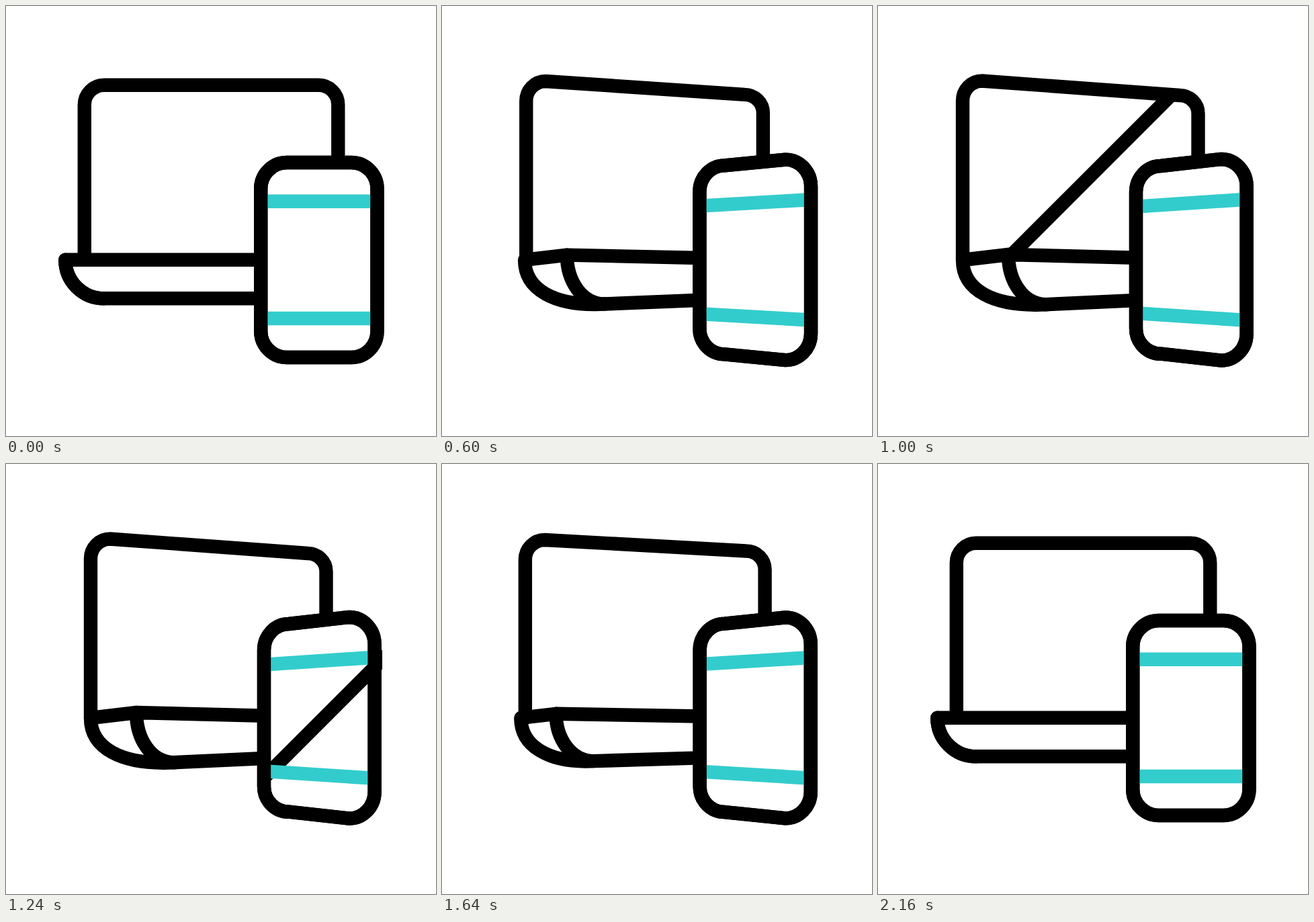
An HTML page for the animation above (2560 ms loop, 640 px wide and 640 px high).

```html
<!DOCTYPE html>
<html lang="en">
<head>
<meta charset="utf-8">
<title>Laptop and phone</title>
<style>
  html, body { margin: 0; width: 100%; height: 100%; overflow: hidden; background: #fff; }
  svg { display: block; width: 100vw; height: 100vh; }
  path { fill: none; stroke: #000; stroke-width: 20.4; stroke-linejoin: round; }
  .teal { stroke: #3cc; }
</style>
</head>
<body>
<svg viewBox="0 0 640 640">
  <clipPath id="screenClip">
    <path d="M126 378 V141 C126 124.7 138.7 111.5 155 111.5 L449 133 C464 133 476.5 145 476.5 160 V376 L194 370 Z"/>
  </clipPath>
  <clipPath id="phoneClip"><rect x="384" y="232" width="176" height="292" rx="40"/></clipPath>
  <g stroke-linecap="round">
    <path id="screen"/>
    <path id="base"/>
    <path id="side"/>
  </g>
  <g clip-path="url(#screenClip)"><path class="glare"/></g>
  <path id="phoneBack" style="fill:#fff"/>
  <g clip-path="url(#phoneClip)"><path class="glare"/></g>
  <path id="bars" class="teal"/>
  <path id="phone"/>
</svg>
<script>
const LOOP = 2560, STEP = 40;

// Each part: flat outline, turned outline
const laptop = {
  screen: [
    'M116.8 377.7 L116.8 147 C116.8 130.9 129.8 117.8 146 117.8 L465.5 117.8 C481.5 117.8 494.3 131 494.3 147 L494.3 240',
    'M126 378 L126 141 C126 124.7 138.7 111.5 155 111.5 L449 133 C464 133 476.5 145 476.5 160 L476.5 240'],
  base: [
    'M385 377.7 L88.3 377.7 C88.3 409.6 114 435.3 146 435.3 L385 435.3',
    'M385 374.8 L194 370 C194 409 216 444 250 444.2 L385 438'],
  side: [
    'M88.3 377.7 L88.3 377.7 C88.3 409.6 114 435.3 146 435.3 L146 435.3',
    'M194 370 L126 378 C126 425 175 445 235 444.7 L250 444.2']
};
const phoneShape = [
  'M379.2 272 C379.2 250.5 396.6 233 418 233 L514 233 C535.3 233 552.5 250.5 552.5 272 L552.5 484 C552.5 505.5 535.3 523 514 523 L418 523 C396.6 523 379.2 505.5 379.2 484 Z',
  'M384 277 C384 255.5 400.6 238 421 238 L511 228 C531.7 228 548.6 246 548.6 268 L548.6 488 C548.6 510 531.7 527.7 511 527.7 L421 517.7 C400.6 517.7 384 501 384 480 Z'];
const phone = {
  phoneBack: phoneShape,
  bars: [
    'M379.2 290.8 L552.5 290.8 M379.2 465 L552.5 465',
    'M384 298.6 L548.6 287.8 M384 457.1 L548.6 467.9'],
  phone: phoneShape
};

const clamp = u => Math.min(1, Math.max(0, u));
const ease = u => u < .5 ? (2 * u) ** 2.7 / 2 : 1 - (2 - 2 * u) ** 2.7 / 2;
const ramp = (t, from, to) => ease(clamp((t - from) / (to - from)));

function morph([a, b], k) {
  const ends = b.match(/[\d.]+/g);
  let i = 0;
  return a.replace(/[\d.]+/g, v => (+v + (ends[i++] - v) * k).toFixed(2));
}

function pose(parts, k) {
  for (const id in parts) document.getElementById(id).setAttribute('d', morph(parts[id], k));
}

const glares = document.querySelectorAll('.glare');

function draw() {
  const t = Math.floor(performance.now() % LOOP / STEP) * STEP;
  pose(laptop, ramp(t, 120, 760) - ramp(t, 1400, 2040));
  pose(phone, ramp(t, 200, 770) - ramp(t, 1480, 2160));
  // The diagonal glare sweeps across both devices at a steady speed
  const x = 569 + (t - 1000) * 1.175;
  glares.forEach(g => g.setAttribute('d', `M${x} 0 L${x - 640} 640`));
  requestAnimationFrame(draw);
}
draw();
</script>
</body>
</html>
```
